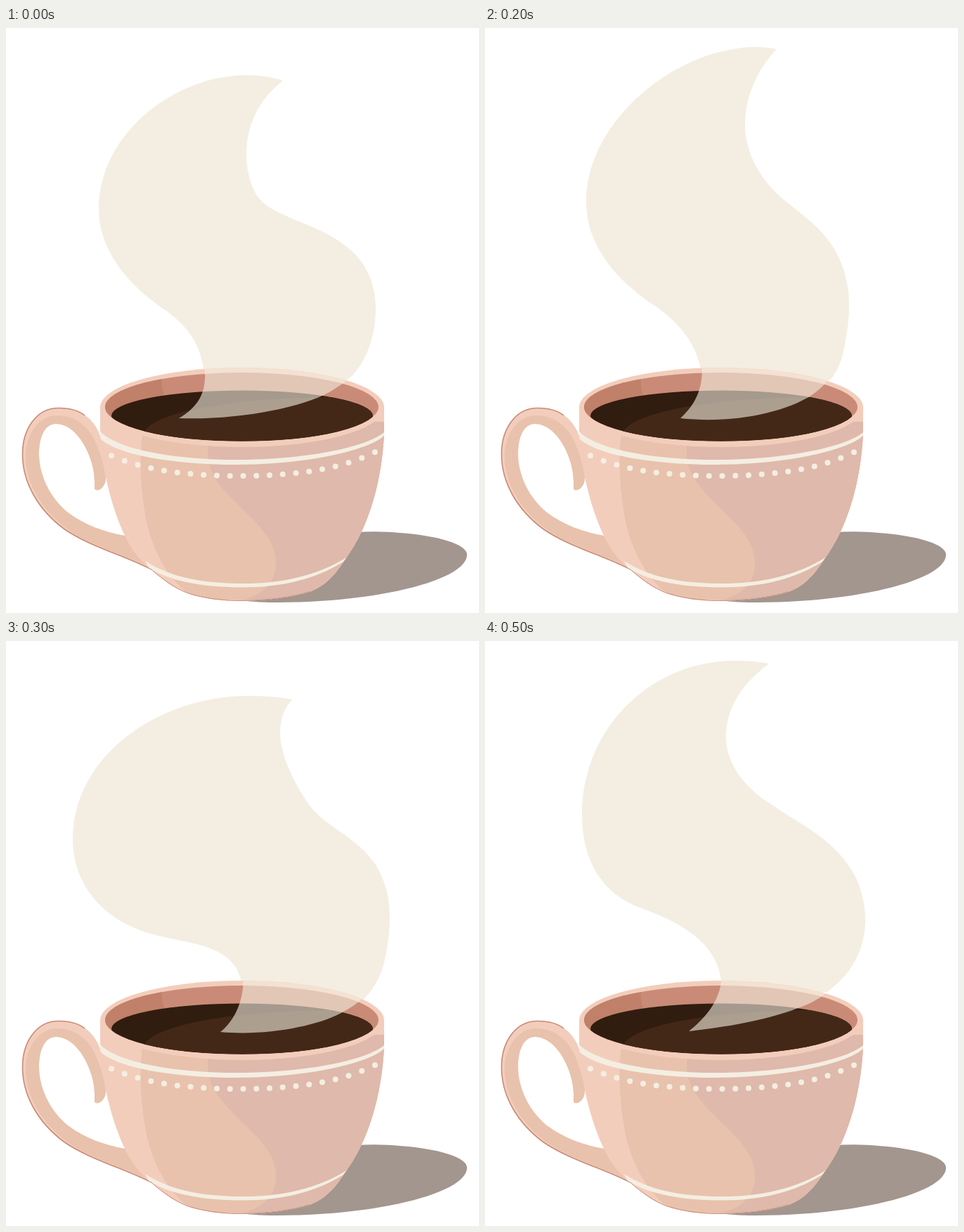
Animation, 673 px wide and 832 px high, one loop 0.6 s. Source, as an HTML page:

```html
<!DOCTYPE html>
<html lang="en">
<head>
<meta charset="utf-8">
<title>Hot coffee</title>
<style>
  html, body { margin: 0; width: 100%; height: 100%; overflow: hidden; background: #fff; }
  svg { display: block; width: 100%; height: 100%; }
  .light { fill: #f3cdbb; }
  .mid { fill: #e8c2ac; }
  .shade { fill: #dfb9ab; }
  .cream { fill: #f4eee2; }
  .line { fill: none; stroke: #c98b77; stroke-width: 1.6; }
</style>
</head>
<body>
<svg viewBox="0 0 673 832">
  <defs>
    <clipPath id="body"><path id="bowl" d="M134 539 V576 C136 625 150 682 169 722 C178 741 190 757 205 769 C222 784 238 796 258 804 C280 811 305 815 336 815 C375 814 410 809 432 802 C455 793 468 778 481 758 C491 744 499 731 506 716 C525 676 536 625 538 576 V539 Z"/></clipPath>
    <clipPath id="rim"><ellipse cx="336" cy="539.5" rx="202" ry="56.5"/></clipPath>
    <clipPath id="mouth"><ellipse cx="335.5" cy="539" rx="194.5" ry="49"/></clipPath>
    <clipPath id="drink"><ellipse cx="336" cy="551.5" rx="186" ry="36"/></clipPath>
  </defs>

  <path fill="#a3968e" d="M470 719 Q525 714 560 718 C615 722 656 734 656 749 C656 785 530 817 385 817 Q350 817 330 813 Z"/>
  <g id="back" class="cream"></g>

  <g id="handle">
    <path class="light" d="M142 640 C142 615 138 585 130 571 C120 551 100 540 75 540 C42 540 23 572 23 606 C23 646 45 684 82 712 C118 737 165 749 207 770 L200 722 L169 722 C140 717 112 707 88 689 C62 668 47 635 47 606 C47 580 56 563 71 563 C103 563 126 613 126 643 Q126 650 126 655 C128 661 142 655 142 640 Z"/>
    <path class="mid" d="M142 640 C141 628 136 610 130 595 C120 567 98 551 73 551 C45 551 28 580 28 609 C28 647 50 684 84 710 C118 736 165 747 207 768 L200 722 L169 722 C140 717 112 707 88 689 C62 668 47 635 47 606 C47 580 56 563 71 563 C103 563 126 613 126 643 Q126 650 126 655 C128 661 142 655 142 640 Z"/>
    <path class="line" d="M112 551 C102 543 90 540.500 75 540.500 C42 540.500 23.500 572 23.500 606 C23.500 646 45 684 82 712 C118 737 165 749 207 770"/>
  </g>

  <use href="#bowl" class="light"/>
  <g clip-path="url(#body)">
    <path class="mid" d="M195 570 C189 610 191 650 198 692 C206 738 228 783 264 808 V832 H560 V560 Z"/>
    <path class="shade" d="M287 585 V605 C288 640 312 659 336 684 C364 711 384 731 384 762 C384 792 362 809 326 816 V832 H560 V560 H287 Z"/>
    <path class="cream" d="M134 574 C160 600 240 614 330 614 C420 614 510 598 538 575 V580 C512 603 420 621 330 621 C240 621 160 608 134 584 Z"/>
    <path class="cream" d="M198 758 C240 785 290 790 340 790 C400 790 450 775 486 752 L480 759 C445 781 400 795.500 336 795.500 C290 795.500 240 790 203 768 Z"/>
    <path class="line" d="M205 769 C222 784 238 796 258 804 C280 811 305 815 336 815 C375 814 410 809 432 802"/>
  </g>
  <g id="dots" class="cream"></g>

  <ellipse class="light" cx="336" cy="539.5" rx="202" ry="56.5"/>
  <g clip-path="url(#mouth)">
    <path fill="#c98b77" d="M130 480 H540 V600 H130 Z"/>
    <path fill="#c0806a" d="M130 480 H226 Q217 508 227 526 V600 H130 Z"/>
    <g clip-path="url(#drink)">
      <path fill="#301d0f" d="M140 510 H530 V595 H140 Z"/>
      <path fill="#432818" d="M195 580 C198 546 330 525 470 525 Q500 525 530 535 V600 H195 Z"/>
    </g>
  </g>
  <g id="front" class="cream" opacity=".6" clip-path="url(#rim)"></g>
</svg>
<script>
  const STEP = 100;

  // Each pose: the plume above the rim, and its foot seen inside the cup.
  const poses = [
    ["M282 510 C284 455 260 425 225 400 C180 370 132 320 132 258 C132 150 240 67 343 67 Q372 67 394 75 C355 105 342 145 342 180 C342 200 347 220 355 235 C375 272 450 275 495 320 C517 342 526 370 526 398 C526 440 512 480 484 502 Z",
     "M282 480 C286 510 280 535 246 555 C330 558 420 540 460 518 C485 503 500 490 510 475 Z"],
    ["M264 510 C258 445 240 425 205 402 C160 370 111 320 111 256 C111 150 220 54 327 54 Q354 54 375 62 C340 93 324 130 324 165 C324 190 333 220 347 241 C380 287 455 292 495 342 C510 361 517 385 517 411 C517 450 510 485 490 503 Z",
     "M262 475 Q268 530 258 556 C350 562 430 548 470 521 Q495 503 505 478 Z"],
    ["M309 505 C308 455 278 420 240 394 C195 364 144 315 144 247 C144 130 275 27 385 27 Q402 27 415 30 C385 62 370 100 370 138 C370 175 390 215 425 244 C465 277 495 295 511 346 C516 363 518 378 518 395 Q518 420 512 450 C508 475 500 492 489 502 Z",
     "M308 475 C312 510 300 535 278 555 C350 563 425 548 465 522 Q490 505 500 480 Z"],
    ["M337 505 C337 465 318 444 275 432 C235 422 205 420 172 403 C130 382 95 340 95 282 C95 165 215 78 345 78 Q380 78 407 83 C395 97 390 112 390 131 C390 160 410 205 435 238 C462 268 500 280 526 318 C540 342 546 365 546 393 Q546 420 540 448 C534 480 520 500 505 513 Z",
     "M337 475 C340 505 328 538 305 556 C370 562 440 548 475 530 C500 517 522 500 530 475 Z"],
    ["M282 505 C279 450 255 421 225 400 C205 385 200 379 185 371 C145 349 117 305 117 255 C117 135 240 46 370 46 Q395 46 420 51 C385 83 370 120 370 155 C370 190 395 235 430 264 C465 292 510 316 522 360 Q525 375 527 395 Q530 425 527 457 C524 485 510 505 495 514 Z",
     "M327 475 C329 510 318 535 290 556 C360 559 430 542 462 528 C492 516 514 502 522 475 Z"],
    ["M336 505 C342 445 300 408 225 381 C165 361 138 310 138 248 C138 120 240 28 355 28 Q382 28 404 32 C365 62 343 95 343 137 C343 175 370 210 410 234 C450 262 500 283 527 335 C537 357 541 375 541 398 C541 440 520 475 487 499 Z",
     "M337 475 C336 510 315 535 290 555 C380 545 430 530 465 514 Q492 500 508 478 Z"]
  ];

  function add(parent, tag, attrs) {
    const el = document.createElementNS("http://www.w3.org/2000/svg", tag);
    for (const key in attrs) el.setAttribute(key, attrs[key]);
    return document.getElementById(parent).appendChild(el);
  }

  for (let i = 0; i < 21; i++) {
    const x = 150 + 18.75 * i, d = x - 332;
    add("dots", "circle", { cx: x, cy: 637 - 5.5e-4 * d ** 2 - 9.5e-9 * d ** 4, r: 4 });
  }

  const loop = STEP * poses.length;
  const blink = [
    { opacity: 1, easing: "step-end" },
    { opacity: 0, offset: 1 / poses.length },
    { opacity: 0 }
  ];
  poses.forEach((shapes, i) => {
    ["back", "front"].forEach((layer, k) => {
      add(layer, "path", { d: shapes[k] })
        .animate(blink, { duration: loop, delay: i * STEP - loop, iterations: Infinity });
    });
  });
</script>
</body>
</html>
```
